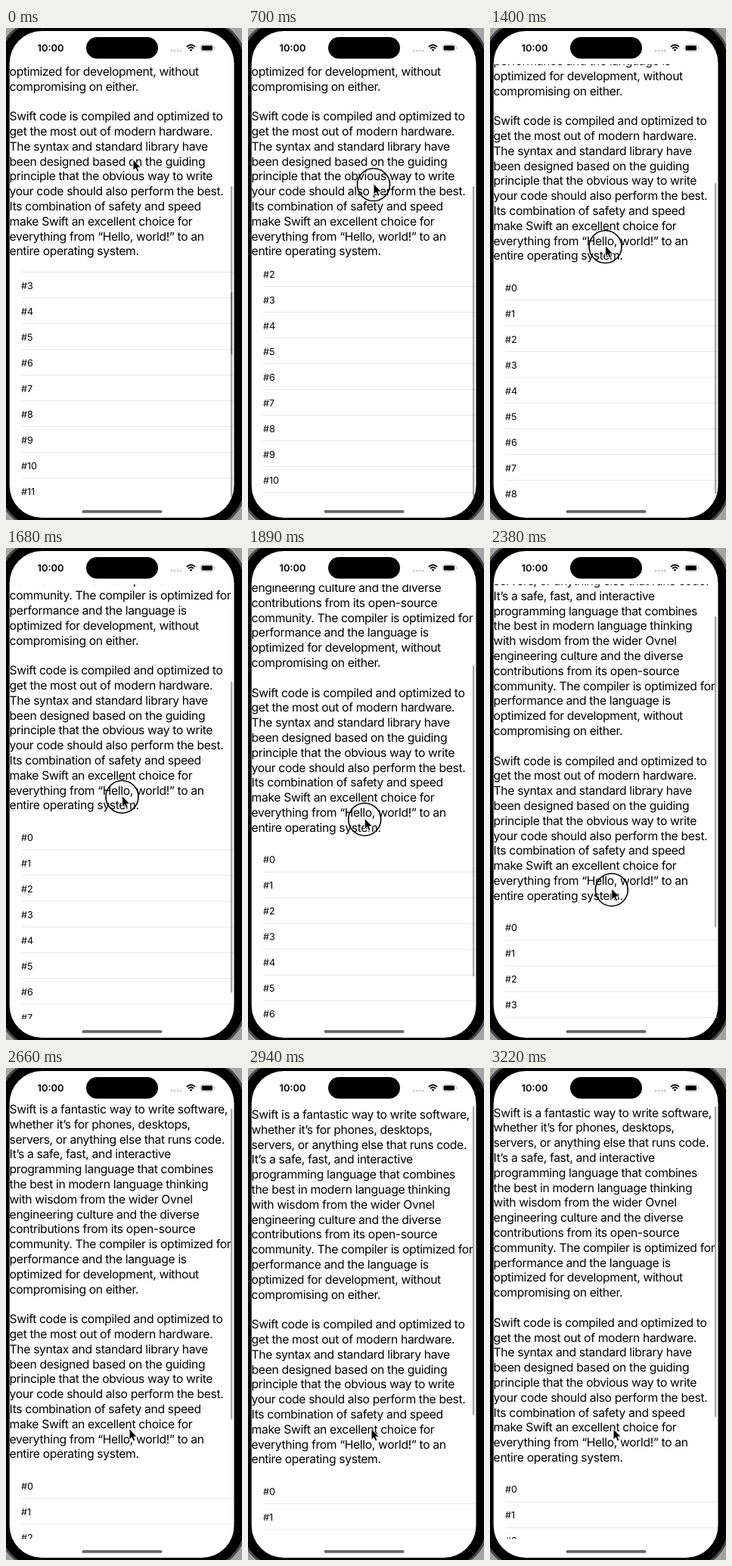
Animation of 312x650 px, one loop 3.29 s. Source, as an HTML page:

```html
<!DOCTYPE html>
<html lang="en">
<head>
<meta charset="utf-8">
<title>Nested scrolling</title>
<style>
  html, body { margin: 0; width: 100%; height: 100%; overflow: hidden; background: #000; }
  svg { display: block; width: 312px; height: 650px; font-family: Inter, Roboto, sans-serif; }
  text { white-space: pre; text-rendering: geometricPrecision; }
  #article { font-size: 15.7px; letter-spacing: -0.35px; }
  #rows { font-size: 12.6px; }
  .clock { font-size: 12.8px; font-weight: 600; text-anchor: middle; }
</style>
</head>
<body>
<svg viewBox="0 0 312 650">
  <defs>
    <clipPath id="page"><rect x="4" y="48" width="298" height="574"/></clipPath>
    <clipPath id="list"><rect x="4" y="539.5" width="298" height="600"/></clipPath>
  </defs>

  <rect width="312" height="650" fill="#a4a4a4"/>
  <rect x="-9" y="-10" width="325" height="671" rx="56" stroke="#4a4a4a" stroke-width="3"/>
  <rect x="4.7" y="4" width="296.8" height="643" rx="42.5" fill="#fff"/>

  <g clip-path="url(#page)">
    <g id="content">
      <g id="article"></g>
      <g clip-path="url(#list)"><g id="rows"></g></g>
    </g>
  </g>
  <rect id="pageBar" x="297" width="2.3" rx="1.15" fill-opacity=".35"/>
  <rect id="listBar" x="297" y="349" width="2.3" height="82.5" rx="1.15" fill-opacity=".35"/>

  <rect x="106" y="12" width="95" height="28.5" rx="14.25"/>
  <text class="clock" x="59" y="31">10:00</text>
  <g fill="#bdbdbd">
    <circle cx="219.3" cy="30" r="1.2"/><circle cx="223.3" cy="30" r="1.2"/>
    <circle cx="227.3" cy="30" r="1.2"/><circle cx="231.3" cy="30" r="1.2"/>
  </g>
  <g transform="translate(0 -.4)">
    <g fill="none" stroke="#000" stroke-width="1.8">
      <path d="M238.9 25.2Q244.5 20.2 250.1 25.2"/>
      <path d="M240.9 27.5Q244.5 24.3 248.1 27.5"/>
    </g>
    <path d="M242.5 29.1Q244.5 27.5 246.5 29.1L244.5 31.2Z"/>
    <rect x="257.3" y="22.3" width="17" height="8.8" rx="2.7" fill="none" stroke="#aaa" stroke-width=".8"/>
    <rect x="258.6" y="23.6" width="14.4" height="6.2" rx="1.7"/>
    <path d="M275.3 25.2q1.3 .5 1.3 1.5t-1.3 1.5z" fill="#aaa"/>
  </g>
  <rect x="100.5" y="637" width="106" height="3.8" rx="1.9" fill="#666"/>

  <g id="pointer">
    <circle id="touch" cx="0" cy="1" r="21.5" fill="none" stroke="#000" stroke-width="1.6"/>
    <path d="M0 -.5V14.2L3.3 11.2L5.5 16.2L8 15.1L5.8 10.3H10.3Z" stroke="#fff" stroke-width="1" stroke-linejoin="round"/>
  </g>
</svg>
<script>
const LOOP = 3290, STEP = 70;
const PAGE_MAX = 219.5, LIST_START = 99;
const LINE = 19.8, ROW = 34, ROW_COUNT = 14;
const $ = id => document.getElementById(id);

const copy = `Swift is a fantastic way to write software,
whether it’s for phones, desktops,
servers, or anything else that runs code.
It’s a safe, fast, and interactive
programming language that combines
the best in modern language thinking
with wisdom from the wider Ovnel
engineering culture and the diverse
contributions from its open-source
community. The compiler is optimized for
performance and the language is
optimized for development, without
compromising on either.

Swift code is compiled and optimized to
get the most out of modern hardware.
The syntax and standard library have
been designed based on the guiding
principle that the obvious way to write
your code should also perform the best.
Its combination of safety and speed
make Swift an excellent choice for
everything from “Hello, world!” to an
entire operating system.`;

function add(parent, tag, attrs, label) {
  const el = document.createElementNS('http://www.w3.org/2000/svg', tag);
  for (const key in attrs) el.setAttribute(key, attrs[key]);
  if (label) el.textContent = label;
  parent.append(el);
}

copy.split('\n').forEach((line, i) => {
  if (line) add($('article'), 'text', { x: 4.6, y: 64.4 + i * LINE }, line);
});
for (let i = 0; i < ROW_COUNT; i++) {
  const mid = 556.5 + i * ROW;
  add($('rows'), 'text', { x: 20, y: mid + 4.6 }, '#' + i);
  add($('rows'), 'rect', { x: 20, y: mid + 16.2, width: 281, height: 0.8, fill: '#e2e2e4' });
}

// Rows of [time, value, ...]; linear between rows.
const pointerPath = [
  [490, 168, 174], [700, 166, 206], [1400, 152.5, 288],
  [1890, 154.2, 357.5], [2380, 160.8, 450.5], [2520, 163, 477]
];
const dragPath = [
  [490, 0], [560, 3], [700, 19], [1400, 105],
  [1890, 173.5], [2380, 263.5], [2520, 289.5], [2685, 318.5]
];
const touchFade = [[210, 0], [280, .5], [350, 1], [2520, 1], [2590, .4], [2660, 0]];
const listBarFade = [[0, 1], [70, .5], [140, 0]];

function sample(path, t) {
  const next = path.findIndex(p => p[0] > t);
  if (next < 0) return path.at(-1).slice(1);
  if (next === 0) return path[0].slice(1);
  const a = path[next - 1], b = path[next];
  const k = (t - a[0]) / (b[0] - a[0]);
  return a.slice(1).map((v, i) => v + (b[i + 1] - v) * k);
}

// Critically damped rebound after reaching the top edge.
function bounce(t) {
  const dt = Math.max(0, t - 2685);
  return 0.17 * dt * Math.exp(-0.011 * dt);
}

function draw(t) {
  const [drag] = sample(dragPath, t);
  const over = bounce(t);
  const listOffset = Math.max(0, LIST_START - drag);
  const pageOffset = PAGE_MAX - Math.max(0, drag - LIST_START);
  $('content').setAttribute('transform', `translate(0 ${over - pageOffset})`);
  $('rows').setAttribute('transform', `translate(0 ${-listOffset})`);
  $('pageBar').setAttribute('y', 50.5 + pageOffset * 0.722);
  $('pageBar').setAttribute('height', 411 - over);
  $('listBar').setAttribute('opacity', sample(listBarFade, t)[0]);
  $('pointer').setAttribute('transform', `translate(${sample(pointerPath, t).join(' ')})`);
  $('touch').setAttribute('opacity', sample(touchFade, t)[0]);
}

const start = performance.now();
function tick() {
  const t = (performance.now() - start) % LOOP;
  draw(Math.floor(t / STEP) * STEP);
  requestAnimationFrame(tick);
}
tick();
</script>
</body>
</html>
```
